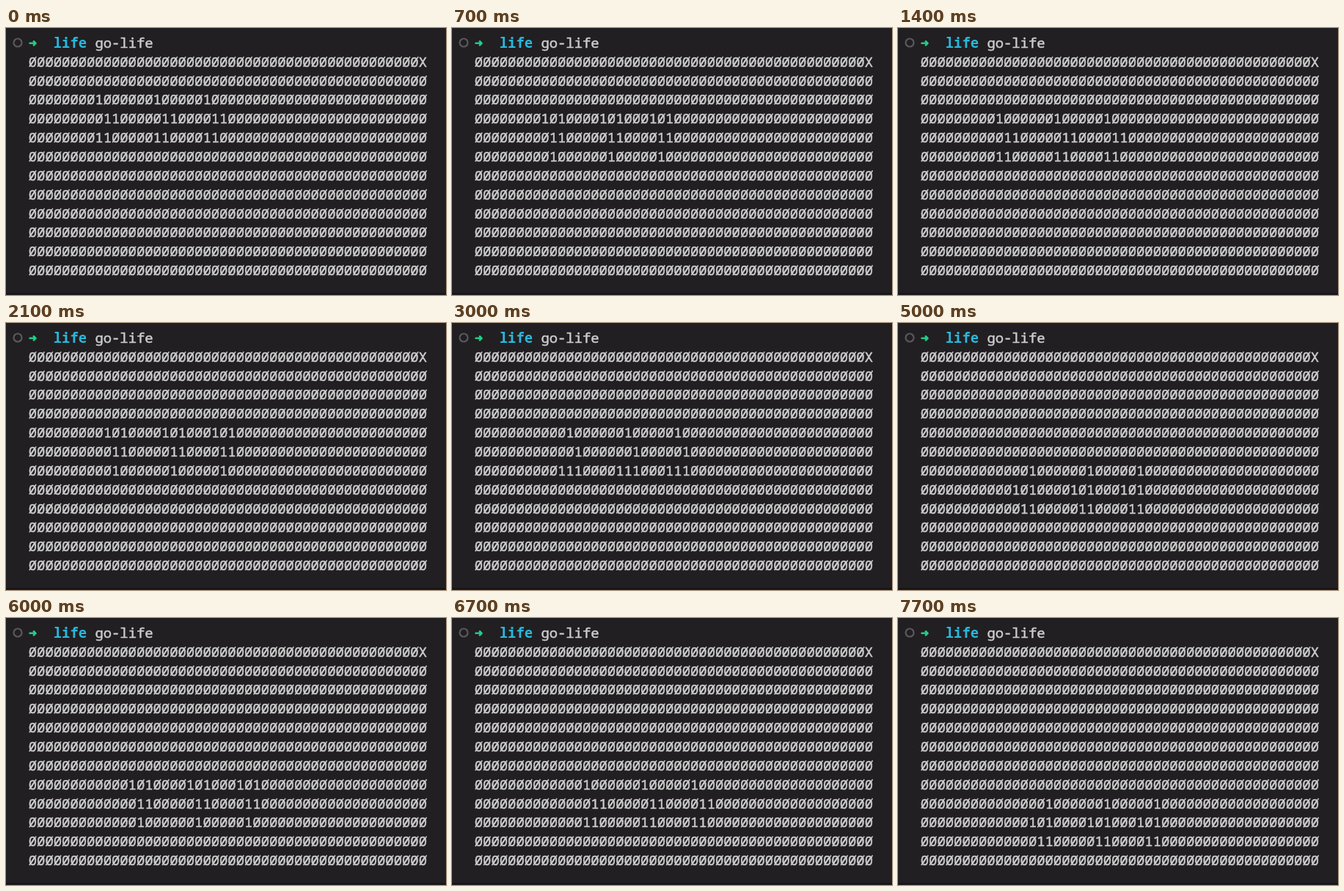
Recreate the animation shown at these times as an HTML page. Size 600 px wide and 364 px high, loop 8000 ms.

```html
<!DOCTYPE html>
<html lang="en">
<head>
<meta charset="utf-8">
<title>go-life</title>
<style>
  html, body { margin: 0; height: 100%; overflow: hidden; background: #211f22; }
  svg { display: block; width: 600px; height: 364px; }
  text { font: 18.88px "Noto Sans Mono", monospace; fill: #cccccc; stroke: #cccccc; stroke-width: 0.5; }
  .arrow { font: bold 13.5px "DejaVu Sans", sans-serif; fill: #23d18b; stroke: #23d18b; stroke-width: 0.9; }
  .dir { font-weight: 700; fill: #29b8db; stroke: none; }
  #board path { stroke: #cccccc; stroke-width: 1.5; }
</style>
</head>
<body>
<svg viewBox="0 0 600 364">
  <rect y="361.5" width="600" height="1.5" fill="#131214"/>
  <circle cx="16" cy="20" r="5.5" fill="none" stroke="#5a585b" stroke-width="2.2"/>
  <text class="arrow" x="31" y="25">➜</text>
  <text class="dir" x="64.8" y="26.9">life</text>
  <text x="121.4" y="26.9">go-life</text>
  <g id="board"></g>
</svg>
<script>
const COLS = 48, ROWS = 12, LOOP = 8000, TICK = 100;
const LEFT = 30.8, PITCH = 11.328, BASELINE = 52.7, LINE = 25.85;
const GLIDER = [[0, 0], [1, 1], [2, 1], [0, 2], [1, 2]];

const board = document.getElementById('board');
const add = tag => board.appendChild(document.createElementNS('http://www.w3.org/2000/svg', tag));

const lines = Array.from({ length: ROWS }, (_, y) => {
  const text = add('text'), slashes = add('path'), base = BASELINE + y * LINE;
  text.setAttribute('x', LEFT);
  text.setAttribute('y', base);
  return { text, slashes, base };
});

// Each zero gets a slash reaching past its outline.
function write({ text, slashes, base }, digits) {
  text.textContent = digits;
  slashes.setAttribute('d', [...digits].map((digit, x) =>
    digit === '0' ? `M${LEFT + x * PITCH + 0.9} ${base}l9.5 -13.6` : '').join(''));
}

const makeGrid = cell => Array.from({ length: ROWS }, (_, y) =>
  Array.from({ length: COLS }, (_, x) => cell(x, y)));

function step(grid) {
  return makeGrid((x, y) => {
    let sum = 0;
    for (let dy = -1; dy <= 1; dy++)
      for (let dx = -1; dx <= 1; dx++)
        sum += grid[y + dy]?.[x + dx] ?? 0;
    return +(sum === 3 || (sum === 4 && grid[y][x] === 1));
  });
}

const start = makeGrid(() => 0);
for (const left of [8, 15, 21])
  for (const [x, y] of GLIDER) start[2 + y][left + x] = 1;

// Three generations per second, shown on a 100 ms clock.
const generationAt = time => Math.floor(Math.floor(time / TICK) * 3 / 10);
const history = [start];
while (history.length <= generationAt(LOOP - 1)) history.push(step(history.at(-1)));

let shown = -1;
function draw(now) {
  const generation = generationAt(now % LOOP);
  if (generation === shown) return;
  shown = generation;
  history[generation].forEach((row, y) => {
    const digits = row.join('');
    write(lines[y], y ? digits : digits.slice(0, -1) + 'X');
  });
}

const origin = performance.now();
function frame() {
  draw(performance.now() - origin);
  requestAnimationFrame(frame);
}
frame();
</script>
</body>
</html>
```
